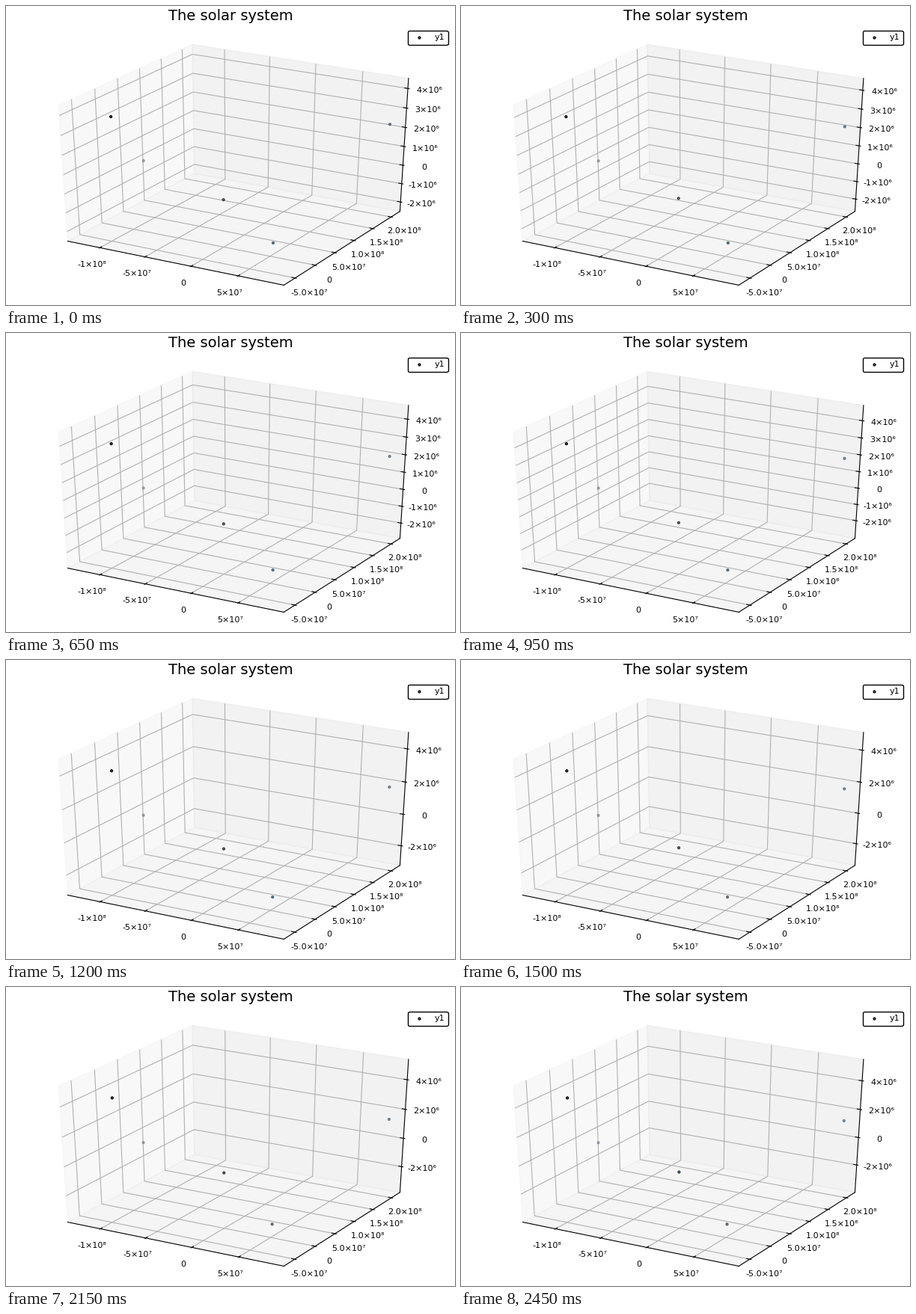
Recreate the animation shown at these times as a matplotlib script. Size 600 by 400 pixels, loop 2500 ms.

```python
import math

import matplotlib.pyplot as plt
import numpy as np
from matplotlib.animation import FuncAnimation
from matplotlib.collections import LineCollection
from matplotlib.patches import Polygon

FRAMES, INTERVAL = 50, 50

# Plot area in pixels and the 3D view window it shows
LEFT, RIGHT, TOP, BOTTOM = 3.94, 596.06, 27.3, 396.06
VIEW = 0.185
SCALE = np.array([RIGHT - LEFT, TOP - BOTTOM]) / VIEW
CENTER = np.array([LEFT, TOP]) + SCALE * [0.095, -0.09]

# Camera; the box spans -0.5..0.5 on each axis
AZIM, ELEV, DIST = math.radians(-60), math.radians(30), 9.6
SIDE = np.array([-math.sin(AZIM), math.cos(AZIM), 0])
TOWARD = np.array([math.cos(ELEV) * math.cos(AZIM),
                   math.cos(ELEV) * math.sin(AZIM), math.sin(ELEV)])
UP = np.cross(TOWARD, SIDE)

# Position in millions of km, then the drift per loop shared by all axes
BODIES = {
    "sun": (0, 0, 0, 0),
    "mercury": (42.9, 23.8, -2.19, -1.4),
    "venus": (-87.8, -62.9, 4.18, 0.84),
    "earth": (-125.1, 79.2, 0, -0.69),
    "mars": (86.8, 210.5, 2.23, -0.94),
}
STATE = np.array(list(BODIES.values()))
START, DRIFT = STATE[:, :3], STATE[:, 3:]

WALL = np.array([-0.5, 0.5, -0.5])    # where the three panes stand
MARGIN = (1.06 / 0.96 - 1) / 2
TICK_OUT, TICK_IN, LABEL_GAP = 0.008, 0.016, 0.0638
BLUE, GRID = (0, 0.604, 0.98), "#b0b0b0"


def project(points):
    p = np.asarray(points, float)
    depth = DIST - p @ TOWARD
    flat = np.stack([p @ SIDE, p @ UP], axis=-1) / depth[..., None]
    return CENTER + SCALE * flat, depth


def screen(points):
    return project(points)[0]


def moved(point, axis, value):
    out = np.array(point, float)
    out[axis] = value
    return out


def others(axis):
    return [k for k in range(3) if k != axis]


def tick_axis(axis):
    return 1 if axis == 0 else 0


def edge_point(axis, a):
    """Point at a on the outer edge that carries the axis."""
    k = tick_axis(axis)
    return moved(moved(WALL, axis, a), k, -WALL[k])


def pane(axis):
    j, k = others(axis)
    one = moved(WALL, j, -WALL[j])
    both = moved(one, k, -WALL[k])
    return screen([WALL, one, both, moved(WALL, k, -WALL[k])])


def grid_line(axis, a):
    corner = moved(WALL, axis, a)
    ends = [moved(corner, k, -WALL[k]) for k in others(axis)]
    # The line bends where two panes meet.
    if axis == 2:
        ends.reverse()
    return screen([ends[0], corner, ends[1]])


def tick_line(axis, a):
    point, k = edge_point(axis, a), tick_axis(axis)
    out = np.sign(point[k])
    return screen([moved(point, k, point[k] + out * TICK_OUT),
                   moved(point, k, point[k] - out * TICK_IN)])


def label_spot(axis, a):
    point = edge_point(axis, a)
    for k in others(axis):
        point[k] += np.sign(point[k]) * LABEL_GAP
    return screen(point)


def nice_ticks(axis, low, high):
    """Multiples of the step inside the view, coarser past seven ticks."""
    step = 1 if axis == 2 else 50

    def multiples(s):
        return s * np.arange(math.ceil(low / s), math.floor(high / s) + 1)

    ticks = multiples(step)
    return ticks if len(ticks) <= 7 else multiples(2 * step)


def sci(value, digits):
    if value == 0:
        return "0"
    e = math.floor(math.log10(abs(value)))
    return f"{value / 10 ** e:.{digits}f}×10{'⁶⁷⁸'[e]}"


plt.rcParams["font.family"] = "DejaVu Sans"
fig = plt.figure(figsize=(6, 4), dpi=100, facecolor="white")
ax = fig.add_axes([0, 0, 1, 1])
ax.axis("off")

for axis, shade in enumerate((0.95, 0.9, 0.925)):
    color = (shade, shade, shade, 0.5)
    ax.add_patch(Polygon(pane(axis), facecolor=color, edgecolor=color,
                         linewidth=1, zorder=1))
    edge = screen([edge_point(axis, -0.5), edge_point(axis, 0.5)])
    ax.plot(*edge.T, color="black", lw=0.8, zorder=3)

grid_lines = LineCollection([], colors=GRID, linewidths=0.8, zorder=2)
tick_lines = LineCollection([], colors="black", linewidths=0.8, zorder=3)
for lines in (grid_lines, tick_lines):
    ax.add_collection(lines, autolim=False)
labels = [ax.text(0, 0, "", fontsize=8, ha="center", va="top", zorder=4)
          for _ in range(20)]
dots = ax.scatter(np.zeros(len(BODIES)), np.zeros(len(BODIES)),
                  s=4, linewidths=1, zorder=5)

ax.text(300, 19, "The solar system", fontsize=14, ha="center", va="baseline")
key = ax.scatter([], [], s=4, color=[BLUE], edgecolors="black", linewidths=1)
ax.legend([key], ["y1"], loc="upper right", fontsize=8, scatterpoints=1,
          bbox_to_anchor=(RIGHT, TOP), bbox_transform=ax.transData,
          framealpha=1, facecolor="white", edgecolor="black")
ax.set_xlim(0, 600)
ax.set_ylim(400, 0)


def draw(frame):
    bodies = START + DRIFT * frame / (FRAMES - 1)
    low, high = bodies.min(axis=0), bodies.max(axis=0)
    extent = high - low
    view_low, view_high = low - 0.03 * extent, high + 0.03 * extent
    low, span = low - MARGIN * extent, (1 + 2 * MARGIN) * extent

    grids, ticks, marks = [], [], []
    for axis in range(3):
        for value in nice_ticks(axis, view_low[axis], view_high[axis]):
            a = (value - low[axis]) / span[axis] - 0.5
            grids.append(grid_line(axis, a))
            ticks.append(tick_line(axis, a))
            marks.append((label_spot(axis, a), sci(value, int(axis == 1))))
    grid_lines.set_segments(grids)
    tick_lines.set_segments(ticks)
    for label in labels:
        label.set_text("")
    for label, (spot, text) in zip(labels, marks):
        label.set_position(spot)
        label.set_text(text)

    # Distant bodies fade out.
    spots, depth = project((bodies - low) / span - 0.5)
    near = 1 / depth
    alpha = 0.3 + 0.7 * (near - near.min()) / (near.max() - near.min())
    dots.set_offsets(spots)
    dots.set_facecolors([(*BLUE, a) for a in alpha])
    dots.set_edgecolors([(0, 0, 0, a) for a in alpha])
    return [grid_lines, tick_lines, dots, *labels]


anim = FuncAnimation(fig, draw, frames=FRAMES, interval=INTERVAL,
                     repeat=True, repeat_delay=0, blit=False)
plt.show()
```
